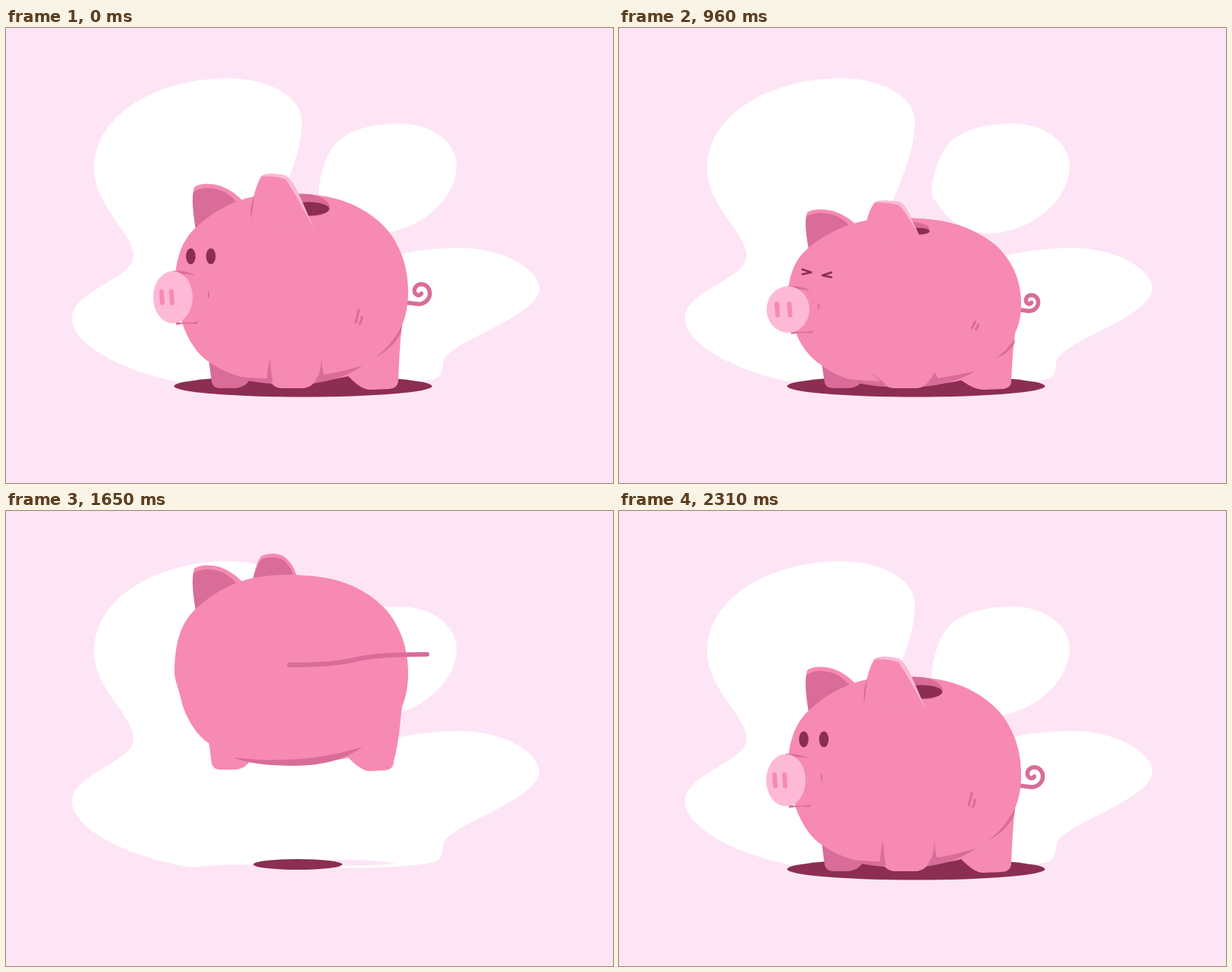
An HTML page with a canvas for the animation above (2430 ms loop, 800 px wide and 600 px high).

```html
<!DOCTYPE html>
<html lang="en">
<head>
<meta charset="utf-8">
<title>Piggy bank</title>
<style>
  html, body { margin: 0; width: 100%; height: 100%; overflow: hidden; background: #fde5f5; }
  canvas { display: block; width: 800px; height: 600px; }
</style>
</head>
<body>
<canvas id="stage" width="800" height="600"></canvas>
<script>
const ctx = document.getElementById('stage').getContext('2d');
const LOOP = 2430, STEP = 30, GROUND = 476;
const C = {
  bg: '#fde5f5', body: '#f68ab2', dark: '#d96c98', light: '#fdb9d6',
  deep: '#8b2e51', gold: '#ffde00', edge: '#fbab2a', shine: '#fff07c', edgeShine: '#ffcb2e'
};

const shapes = {
  blobs: new Path2D(
    'M168 300C168 270 116 235 116 185C117 115 195 67 295 66C350 68 392 92 390 126' +
    'C388 190 345 240 348 282C349 292 353 300 358 306C390 322 420 322 445 316' +
    'C500 301 545 290 597 290C655 290 703 318 703 344C700 380 600 408 579 434' +
    'C573 443 579 456 567 462C545 469 485 470 443 471L440 468Q480 468 515 465' +
    'Q480 459 436 460L400 466C370 467 350 467 327 467' +
    'C295 465 270 468 245 470C165 458 87 420 87 383C88 345 168 332 168 300Z' +
    'M412 215C414 190 424 160 440 147C462 130 492 126 523 126C565 128 594 153 594 182' +
    'C592 234 535 271 487 271C455 269 430 252 418 228Q411 225 412 215Z'),
  farLeg: new Path2D('M267 436L271 467Q273 474 281 475L303 475Q318 473 323 460Z'),
  farEar: new Path2D('M250 265Q244 225 248 210Q256 204 272 206Q292 208 311 227L280 250Z'),
  farEarIn: new Path2D('M250 265Q244 230 247 216Q260 208 280 213Q293 217 303 229Q270 245 250 265Z'),
  backEar: new Path2D('M325 226Q330 200 337 193Q360 184 374 201Q383 213 384 226Z'),
  backEarIn: new Path2D('M325 226Q331 203 338 197Q361 191 371 204Q379 214 380 226Z')
};

const clamp = (v, a = 0, b = 1) => Math.min(b, Math.max(a, v));

// Pairs of [time, value] with smooth easing between them.
function track(t, keys) {
  if (t <= keys[0][0]) return keys[0][1];
  for (let i = 1; i < keys.length; i++) {
    const [t1, v1] = keys[i], [t0, v0] = keys[i - 1];
    if (t <= t1) {
      const u = (t - t0) / (t1 - t0);
      return v0 + (v1 - v0) * u * u * (3 - 2 * u);
    }
  }
  return keys[keys.length - 1][1];
}

function fill(path, color) {
  ctx.fillStyle = color;
  ctx.fill(typeof path === 'string' ? new Path2D(path) : path);
}

function line(d, color, width) {
  ctx.strokeStyle = color;
  ctx.lineWidth = width;
  ctx.lineCap = ctx.lineJoin = 'round';
  ctx.stroke(new Path2D(d));
}

function oval(x, y, rx, ry, color, tilt = 0) {
  ctx.beginPath();
  ctx.ellipse(x, y, rx, ry, tilt, 0, Math.PI * 2);
  ctx.fillStyle = color;
  ctx.fill();
}

function poseAt(t) {
  const rise = t < 1650
    ? track(t, [[1200, 0], [1290, -62], [1410, -112], [1560, -132], [1650, -134]])
    : track(t, [[1650, -134], [1710, -108], [1860, 0]]);
  const spin = t < 1600 || t > 1800 ? 0
    : t < 1650 ? -1.6 * (t - 1600) / 50
    : -1.6 - (Math.PI * 2 - 1.6) * (t - 1650) / 150;
  const s = track(t, [[530, 1], [610, .88], [700, 1.067], [810, 1], [870, 1], [1110, .607],
    [1140, .604], [1185, .62], [1260, 1.05], [1400, 1], [1830, 1], [1920, .69],
    [2040, 1.05], [2140, .98], [2240, 1]]);
  return {
    t, rise, spin, s,
    wide: 1 - s,
    sag: clamp((1 - s) * 30, 0, 6),
    turn: track(t, [[540, 0], [810, 1], [870, 1.1], [1120, 2.8], [1180, 2.8], [1290, 0]]),
    back: Math.cos(spin) < .7,
    y(v) { return GROUND + rise + (v - GROUND) * s; }
  };
}

// Carries a surface point around the body's vertical axis.
function orbit(x, spin) {
  const a = Math.asin(clamp((x - 378) / 160, -1, 1)) + spin;
  return spin ? { x: 378 + 160 * Math.sin(a), seen: Math.cos(a) > 0 } : { x, seen: true };
}

function squashed(p, draw) {
  ctx.save();
  ctx.translate(0, GROUND + p.rise);
  ctx.scale(1, p.s);
  ctx.translate(0, -GROUND);
  draw();
  ctx.restore();
}

function drawShadow(p) {
  const h = -p.rise / 134;
  oval(391.5 - 7 * h, 472.3 - 6.3 * h, 170 - 111.5 * h, 14.2 - 7.2 * h, C.deep);
}

function drawTail(p) {
  if (p.spin) {
    const end = orbit(538, p.spin), y = 334 + p.rise;
    if (end.seen) line(`M${end.x} ${y + 3}Q${end.x + 60} ${y + 3} 460 ${y - 4}T555 ${y - 11}`, C.dark, 6);
    return;
  }
  const t = p.t;
  const size = track(t, [[540, 1], [630, .8], [1200, .8], [1400, 1]]);
  const open = track(t, [[1800, 0], [1870, 1], [1920, 1], [2100, 0]]);
  const lift = track(t, [[1830, 0], [1890, 1], [1930, 0]]);
  const cx = 545.5 - (1 - size) * 17 - open * 10.5;
  const cy = p.y(348) - (1 - size) * 18 - lift * 34;
  ctx.beginPath();
  ctx.moveTo(527, cy + 14 * size + open * 2);
  const from = 1.7 - open * .3, to = -5.5 + open * 3.5;
  for (let a = from; a >= to; a -= .12) {
    const r = (2.5 + 15 * (a + 5.5) / 7.9) * size;
    ctx.lineTo(cx + r * Math.cos(a), cy + r * Math.sin(a));
  }
  ctx.strokeStyle = C.dark;
  ctx.lineWidth = 5.5 - open * .8;
  ctx.lineCap = ctx.lineJoin = 'round';
  ctx.stroke();
}

function drawBody(p) {
  const d = p.sag, foot = 517 + p.rise * .045;
  fill('M224 318C228 292 236 277 250 263C275 240 300 228 327 222C350 218 375 217 392 219' +
    'C420 220 445 226 465 237C490 250 506 267 515 285C525 303 530 325 530 348' +
    `C530 366 527 380 522 392C519 415 518 440 ${foot} 464Q${foot} 475 ${foot - 12} 476` +
    `L480 477Q468 477 451 ${459 + d}C430 ${465 + d} 400 ${467 + d} 345 ${466 + d}` +
    `C310 ${463 + d} 285 ${453 + d} 267 440C248 427 237 404 232 388` +
    'C228 368 222 358 222 346C222 335 223 325 224 318Z', C.body);
  fill(`M300 ${459 + d * .6}Q390 ${470 + d * .6} 470 ${445 + d}Q435 ${470 + d} 380 ${470 + d}` +
    `Q325 ${470 + d} 300 ${459 + d * .6}Z`, C.dark);
  fill(`M451 ${459 + d}Q463 ${456 + d} 472 ${446 + d}L500 462L470 474Z`, C.body);
}

function drawMidLeg(p) {
  const reach = clamp((p.s - .78) / .2);
  if (p.back || !reach) return;
  const top = 470 - 35 * reach, x = 348 - 13 * Math.min(p.turn, 1);
  fill(`M${x} ${top}Q${x - 2} 455 347 464Q353 475 362 475L393 475Q406 473 410 460L416 ${top}Z`, C.body);
  fill(`M${x} ${top}Q${x - 4} 452 344 464L352 468Q${x + 1} 456 ${x} ${top}Z`, C.dark);
  fill(`M416 ${top - 1}Q416 450 420 460L411 462Q415 450 416 ${top - 1}Z`, C.dark);
}

function drawNearEar(p) {
  const k = p.turn, x = 406 - 7 * Math.min(k, 1) - 28 * p.wide, y = 265 - 13 * k;
  const curve = `Q346 190 366 194C378 196 ${x - 17} ${y - 39} ${x} ${y}`;
  fill(`M326 224Q331 203 337 195${curve}L350 262L326 242Z`, C.body);
  fill(`M336 196${curve}C${x - 8} ${y - 15} ${x - 24} ${y - 46} 368 199Q352 194 336 196Z`, C.light);
  if (k < 1) fill(`M327 222Q321 236 323 ${252 - 20 * k}Q325 242 327 222Z`, C.dark);
}

function drawSlot(p) {
  const size = clamp(1 - (p.turn - 1) / 1.4), dx = -5 * Math.min(p.turn + p.wide * 2, 1);
  if (size <= 0) return;
  oval(397 + dx, 233.5, 30 * size, 14.5 * size, C.dark, .12);
  oval(399 + dx, 238.5, 27 * size, 9 * size, C.deep);
}

function coinPath(x, y, rx, ry) {
  const path = new Path2D(), n = 2 / 2.6;
  for (let i = 0; i < 48; i++) {
    const a = i * Math.PI / 24, c = Math.cos(a), s = Math.sin(a);
    path.lineTo(x + rx * Math.sign(c) * Math.abs(c) ** n, y + ry * Math.sign(s) * Math.abs(s) ** n);
  }
  path.closePath();
  return path;
}

function drawCoin(p) {
  const t = p.t;
  if (t < 60 || t > 570) return;
  const u = (t - 60) / 390, y = -60 + 214 * u * u;
  const a = 1.16 + (t - 450) / 120;
  const rx = Math.max(3, 50 * Math.abs(Math.cos(a)));
  const depth = 13 * Math.abs(Math.sin(a));
  const x = 374 + track(t, [[450, 0], [560, 18]]);
  const fx = x - depth / 2;
  ctx.save();
  ctx.beginPath();
  ctx.rect(0, -200, 800, 441);
  ctx.clip();
  const rim = new Path2D();
  for (let d = 0; d <= depth; d++) rim.addPath(coinPath(fx + d, y - d * .1, rx, 49));
  fill(rim, C.edge);
  ctx.save();
  ctx.clip(rim);
  ctx.fillStyle = C.edgeShine;
  ctx.fillRect(fx, y - 32, 60, 19);
  ctx.fillRect(fx, y - 6, 60, 9);
  ctx.restore();
  const face = coinPath(fx, y, rx, 50);
  fill(face, C.gold);
  ctx.clip(face);
  const band = (top, h) => fill(
    `M${fx - rx} ${y + top}L${fx + rx} ${y + top - 34}v${h}L${fx - rx} ${y + top + h}Z`, C.shine);
  band(-2, 22);
  band(23, 10);
  ctx.restore();
}

function drawEye(p, x, side) {
  const pos = orbit(x, p.spin), y = p.y(301);
  if (!pos.seen) return;
  if (p.t >= 960 && p.t < 1230) {
    const cx = pos.x + 4, cy = y + (side < 0 ? 3 : -1), w = 6 * side;
    line(`M${cx - w} ${cy - 3.5}L${cx + w} ${cy + .5}L${cx - w} ${cy + 3}`, C.deep, 2.4);
    return;
  }
  const long = track(p.t, [[1800, 0], [1880, 1], [1900, 1], [2010, 0]]);
  const small = track(p.t, [[540, 0], [810, 1], [950, 1.5], [960, 0]]);
  const dx = long * (side > 0 ? 6 : -1);
  oval(pos.x + dx, y + small, 6.3 - 1.8 * long - small * .5, 10.5 + 2.5 * long - small * 1.5,
    C.deep, .16 * long + .1 * small);
}

function drawFace(p) {
  const wide = p.wide, rx = 26 + wide * 18;
  const snout = orbit(194 + rx + wide * 4, p.spin), y = p.y(355) + clamp(wide) * 9;
  const ry = 34.5 * p.s + wide * 3;
  drawEye(p, 243.5, 1);
  drawEye(p, 270, -1);
  if (!snout.seen) return;
  const x = snout.x;
  if (!p.spin) {
    const top = y - ry, low = y + ry;
    fill(`M${x} ${top - .5}Q${x + 18} ${top - 1} ${x + 30} ${top + 6}Q${x + 18} ${top + 3} ${x} ${top + 4}Z`, C.dark);
    fill(`M${x + 4} ${low - 2}Q${x + 20} ${low + 1} ${x + 35} ${low - 3}Q${x + 29} ${low} ${x + 33} ${low + 1}Q${x + 18} ${low - 1} ${x + 4} ${low + 2}Z`, C.dark);
    const cheek = 266.5 - 5 * Math.min(p.turn, 1) + wide * 10, cy = p.y(352);
    line(`M${cheek} ${cy - 4 * p.s}q1.5 4 0 ${7 * p.s}`, C.dark, 1.8);
  }
  oval(x, y, rx, ry, C.light);
  const gap = 6.5 + p.turn * 1.1, mid = x - 8 + 2 * clamp(p.turn + wide * 4);
  for (const side of [-1, 1]) {
    const nx = mid + gap * side;
    line(`M${nx - .5} ${y - 7.5}L${nx + .5} ${y + 7.5}`, C.body, 6);
  }
}

function drawFlank(p) {
  const spot = orbit(track(p.t, [[540, 464], [810, 456], [1120, 482], [1180, 482], [1300, 464]]), p.spin);
  if (!spot.seen || p.back) return;
  const y = p.y(track(p.t, [[540, 381], [810, 370], [1120, 392], [1180, 392], [1300, 381],
    [1800, 381], [1880, 346], [1900, 346], [2040, 381]]));
  const h = track(p.t, [[540, 9], [810, 5], [1180, 5], [1300, 9]]), x = spot.x;
  line(`M${x - 3} ${y + h - 2}L${x + 1} ${y - h}`, C.dark, 3);
  line(`M${x + 2} ${y + h}Q${x + 5} ${y + h - 3} ${x + 5} ${y + h * .2 - 2}`, C.dark, 3);
}

// Ear tips left hanging in the air by the fast landing.
function drawTips(p) {
  if (p.t < 1860 || p.t >= 1920) return;
  const dy = (p.t - 1890) * .5;
  ctx.save();
  ctx.translate(0, dy);
  fill('M255 228Q263 223 275 228Q280 238 280 255Q275 262 262 258Q252 247 255 228Z', C.dark);
  fill('M337 213Q344 205 356 212Q358 229 357 247Q350 253 339 249Q335 235 337 213Z', C.body);
  ctx.restore();
}

function drawPig(p) {
  const tailInFront = p.spin !== 0;
  if (!tailInFront) drawTail(p);
  squashed(p, () => {
    fill(shapes.farEar, C.body);
    fill(shapes.farEarIn, C.dark);
    fill(shapes.farLeg, p.back ? C.body : C.dark);
    if (p.back) {
      fill(shapes.backEar, C.body);
      fill(shapes.backEarIn, C.dark);
    }
    drawBody(p);
    drawMidLeg(p);
    if (!p.back) {
      const k = Math.min(p.turn, 1);
      fill(`M522 ${392 + 9 * k}Q507 ${420 + 3 * k} ${486 + 9 * k} ${435 - 4 * k}Q514 ${420 + 2 * k} 521 ${399 + 9 * k}Z`, C.dark);
      drawSlot(p);
    }
  });
  if (!p.back) {
    drawCoin(p);
    squashed(p, () => drawNearEar(p));
  }
  drawFlank(p);
  drawFace(p);
  if (tailInFront) drawTail(p);
  drawTips(p);
}

function frame(now) {
  const t = Math.floor((now % LOOP) / STEP) * STEP;
  const p = poseAt(t);
  ctx.fillStyle = C.bg;
  ctx.fillRect(0, 0, 800, 600);
  fill(shapes.blobs, '#fff');
  drawShadow(p);
  drawPig(p);
  requestAnimationFrame(frame);
}

requestAnimationFrame(frame);
</script>
</body>
</html>
```
